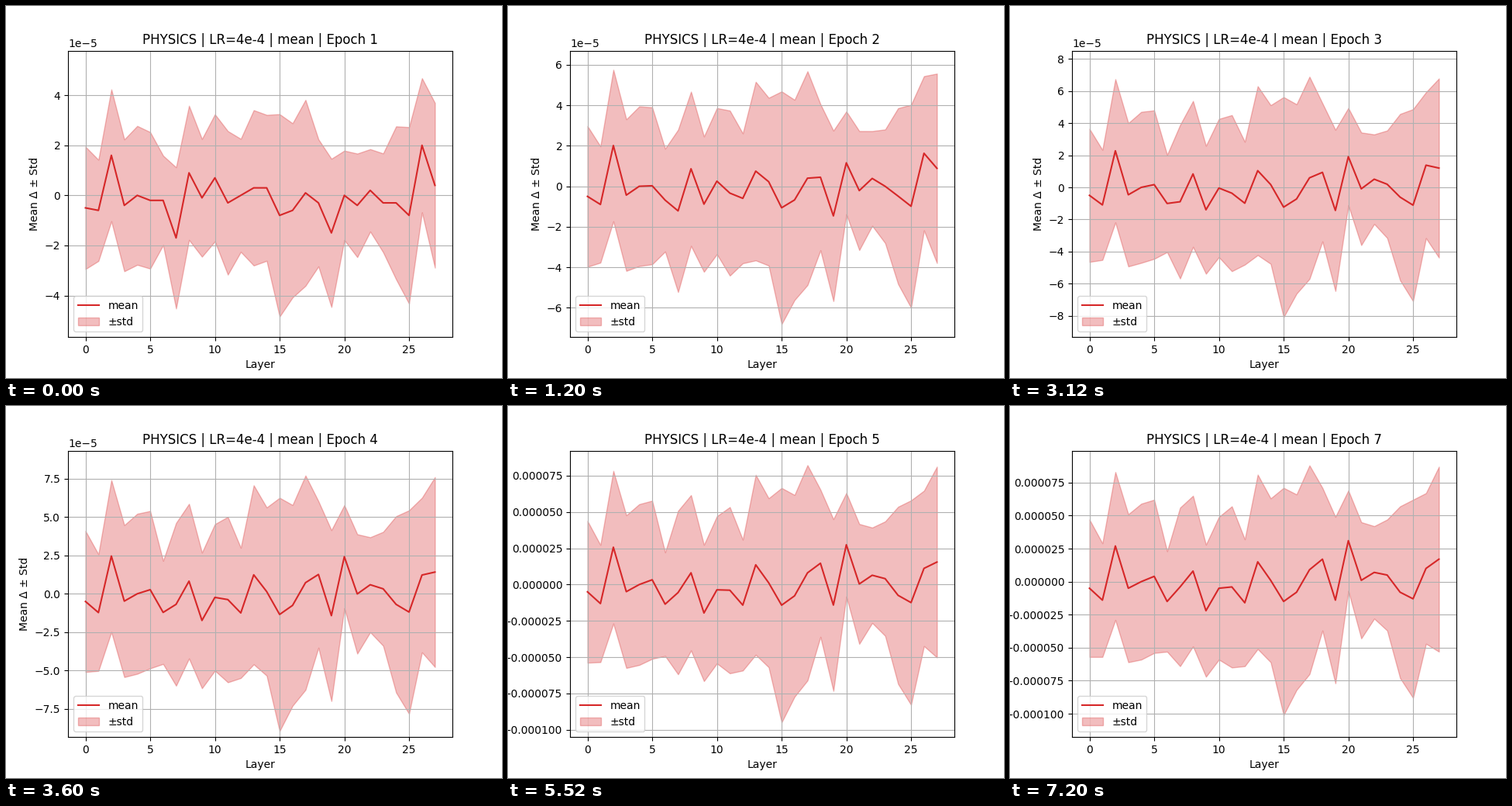
These frames come from a looping animation (640x480 px, 8000 ms). A matplotlib script:

```python
import numpy as np
import matplotlib.pyplot as plt
from matplotlib.animation import FuncAnimation

FRAMES, STEP_MS = 20, 400
FRAMES_PER_EPOCH = 3
EPOCHS = 7
RED = "tab:red"
UNIT = 1e-6

# Key profiles per layer, in units of 1e-6.
first_mean = np.array([-5, -6, 16, -4, 0, -2, -2, -17, 9, -1, 7, -3, 0, 3,
                       3, -8, -6, 1, -3, -15, 0, -4, 2, -3, -3, -8, 20, 4])
last_mean = np.array([-5, -14, 27, -5, 0, 4, -15, -4, 8, -22, -5, -4, -16, 15,
                      1, -15, -8, 9, 17, -14, 31, 1, 7, 5, -8, -13, 10, 17])
last_std = np.array([52, 43, 56, 56, 59, 58, 38, 60, 57, 50, 54, 61, 48, 66,
                     62, 86, 74, 79, 54, 63, 38, 44, 35, 42, 65, 75, 57, 70])
FIRST_STD_RATIO = 0.47
SETTLE_RATE = 0.42

# Lowest and highest value of the band in each epoch.
extents = [(-51.4, 52.6), (-68, 60.5), (-85.2, 77.1), (-84.8, 84.7),
           (-96.1, 83.3), (-100.6, 87), (-107.8, 89.3)]

layers = np.arange(len(last_std))
fig, ax = plt.subplots(figsize=(6.4, 4.8), dpi=100)


def settled(epoch):
    """Exponential approach from 0 in the first epoch to 1 in the last."""
    return np.expm1(-SETTLE_RATE * epoch) / np.expm1(-SETTLE_RATE * (EPOCHS - 1))


def band(epoch):
    w = settled(epoch)
    mean = first_mean + w * (last_mean - first_mean)
    std = last_std * (FIRST_STD_RATIO + w * (1 - FIRST_STD_RATIO))
    return mean * UNIT, std * UNIT


def draw(frame):
    epoch = frame // FRAMES_PER_EPOCH
    mean, std = band(epoch)
    low, high = extents[epoch]
    pad = 0.05 * (high - low)

    ax.clear()
    ax.plot(layers, mean, color=RED, label="mean")
    ax.fill_between(layers, mean - std, mean + std, color=RED, alpha=0.3, label="±std")
    ax.set_ylim((low - pad) * UNIT, (high + pad) * UNIT)
    ax.set_title(f"PHYSICS | LR=4e-4 | mean | Epoch {epoch + 1}")
    ax.set_xlabel("Layer")
    ax.set_ylabel("Mean Δ ± Std")
    ax.grid(True)
    ax.legend(loc="lower left")


anim = FuncAnimation(fig, draw, frames=FRAMES, interval=STEP_MS, repeat=True, repeat_delay=0)
plt.show()
```
